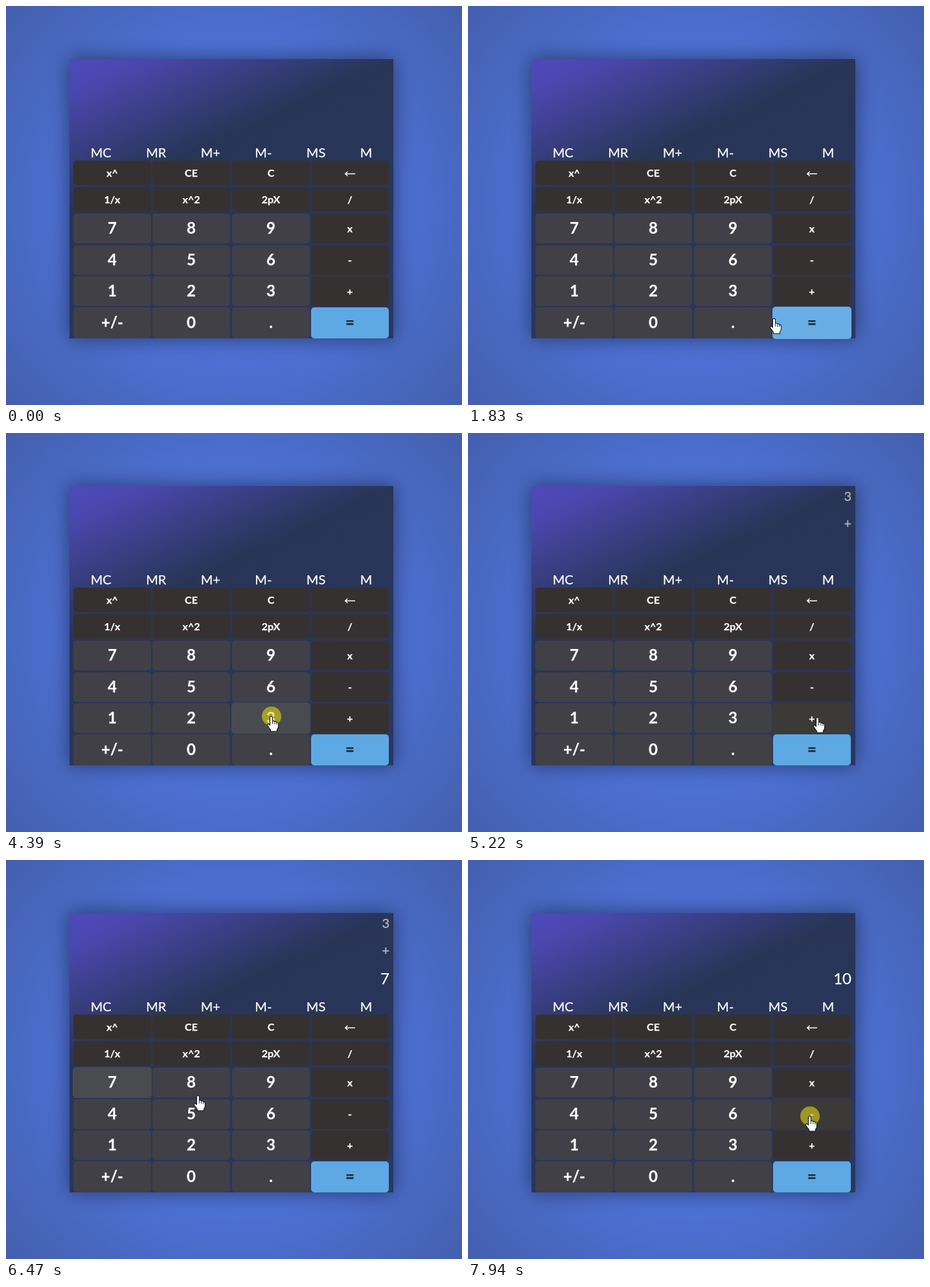
These frames come from a looping animation (704x617 px, 8 s). An HTML page with a canvas:

```html
<!DOCTYPE html>
<html lang="en">
<head>
<meta charset="utf-8">
<title>Calculator</title>
<style>
html, body { margin: 0; width: 100%; height: 100%; overflow: hidden; background: #4a6dcd; }
canvas { display: block; }
</style>
</head>
<body>
<canvas id="stage" width="704" height="617"></canvas>
<script>
const W = 704, H = 617, LOOP = 8000;
const STEP = 68, HOVER_LAG = 130, PRESS = 140;
const BOX = { x: 98, y: 82, w: 500, h: 432, pad: 6 };
const ctx = document.getElementById('stage').getContext('2d');

const LABELS = ['x^ CE C ←', '1/x x^2 2pX /', '7 8 9 x', '4 5 6 -', '1 2 3 +', '+/- 0 . ='];
const MEMORY = ['MC', 'MR', 'M+', 'M-', 'MS', 'M'];
const THEMES = {
  op: { fill: '#353130', hover: '#3c3a37', text: '#fff', size: 16 },
  num: { fill: '#414046', hover: '#4a4b4e', text: '#fff', size: 24 },
  eq: { fill: '#5ea9e3', hover: '#68aee5', text: '#1d2836', size: 24 }
};

const keys = LABELS.flatMap((row, r) => row.split(' ').map((label, c) => ({
  label,
  x: Math.round(104 + 122.4 * c),
  y: Math.round(r < 2 ? 239 + 41 * r : 321.2 + 48.3 * (r - 2)),
  w: 120,
  h: r < 2 ? 38 : r < 5 ? 46 : 48,
  theme: THEMES[label === '=' ? 'eq' : r < 2 || c === 3 ? 'op' : 'num']
})));

// Pointer moves: each goes from the last place to `to`, bowed by `bend` halfway
const ENTRY = [545, 590];
const MOVES = [
  { from: 1420, till: 2230, to: [408, 432], bend: [-3, -27] },
  { from: 2230, till: 2370, to: [424, 446], bend: [0, 0] },
  { from: 3120, till: 3190, to: [410, 438], bend: [0, 0] },
  { from: 4530, till: 4860, to: [540, 440], bend: [0, 0] },
  { from: 5220, till: 5968, to: [173, 346], bend: [-52, -63] },
  { from: 6330, till: 7100, to: [531, 507], bend: [110, -16] },
  { from: 7370, till: 7840, to: [528, 396], bend: [0, 0] }
];
const CLICKS = [[4390, '3'], [4950, '+'], [6190, '7'], [7160, '='], [7940, '-']];
const BURSTS = [1420, 4390, 5220, 6190, 7030];

function pointerAt(t) {
  if (t < MOVES[0].from) return null;
  let at = ENTRY;
  for (const { from, till, to, bend } of MOVES) {
    if (t < from) break;
    const p = Math.min(1, (t - from) / (till - from));
    at = at.map((v, i) => v + (to[i] - v) * p + 4 * p * (1 - p) * bend[i]);
  }
  return at;
}

// The pointer advances in even steps from the start of each burst
function snap(t) {
  const start = BURSTS.filter(s => s <= t).pop();
  return start === undefined ? t : start + Math.floor((t - start) / STEP) * STEP;
}

// Replay every key released so far
function screenAt(t) {
  const s = { first: '', op: '', main: '' };
  for (const [time, key] of CLICKS) {
    if (t < time + PRESS) break;
    if (key >= '0' && key <= '9') s.main += key;
    else if (key === '=') {
      s.main = String(Number(s.first) + Number(s.main));
      s.first = s.op = '';
    } else {
      s.first = s.main;
      s.op = key;
      s.main = '';
    }
  }
  return s;
}

function text(str, x, y, size, color, align = 'center', weight = 400) {
  ctx.font = `${weight} ${size}px Lato, sans-serif`;
  ctx.textAlign = align;
  ctx.fillStyle = ctx.strokeStyle = color;
  ctx.lineWidth = 0.25;
  ctx.fillText(str, x, y);
  ctx.strokeText(str, x, y);
}

function gradient(g, stops) {
  stops.forEach(([at, color]) => g.addColorStop(at, color));
  return g;
}

const backdrop = gradient(ctx.createRadialGradient(W / 2, H / 2, 0, W / 2, H / 2, 468), [
  [0, '#5079e6'], [0.53, '#4c70d3'], [0.75, '#4868c0'], [1, '#445fae']
]);
const panel = gradient(ctx.createLinearGradient(BOX.x, BOX.y, BOX.x + 255, BOX.y + 546), [
  [0, '#4e49b8'], [0.07, '#4c48b1'], [0.35, '#283556'], [1, '#2a3762']
]);

function drawCase() {
  ctx.fillStyle = backdrop;
  ctx.fillRect(0, 0, W, H);
  ctx.save();
  ctx.shadowColor = 'rgba(0, 0, 0, 0.48)';
  ctx.shadowBlur = 30;
  ctx.fillStyle = panel;
  ctx.fillRect(BOX.x, BOX.y, BOX.w, BOX.h);
  ctx.restore();
}

// Labels share the row with equal space around each
function drawMemory() {
  ctx.font = '400 20px Lato, sans-serif';
  const widths = MEMORY.map(m => ctx.measureText(m).width);
  const room = BOX.w - 2 * BOX.pad - widths.reduce((a, b) => a + b);
  const gap = room / MEMORY.length;
  let x = BOX.x + BOX.pad + gap / 2;
  MEMORY.forEach((m, i) => {
    text(m, x, 234, 20, '#fff', 'left');
    x += widths[i] + gap;
  });
}

function drawArrow(x, y) {
  ctx.strokeStyle = '#fff';
  ctx.lineWidth = 1.3;
  ctx.beginPath();
  ctx.moveTo(x + 8, y);
  ctx.lineTo(x - 7, y);
  ctx.moveTo(x - 3.5, y - 3.5);
  ctx.lineTo(x - 7.3, y);
  ctx.lineTo(x - 3.5, y + 3.5);
  ctx.stroke();
}

function drawKey({ x, y, w, h, theme, label }, hovered) {
  const grow = hovered ? 1 : 0;
  ctx.fillStyle = hovered ? theme.hover : theme.fill;
  ctx.beginPath();
  ctx.roundRect(x - grow, y - grow, w + 2 * grow, h + 2 * grow, 5);
  ctx.fill();
  const cx = x + w / 2, cy = y + h / 2;
  if (label === '←') drawArrow(cx, cy + 1.5);
  else text(label, cx, Math.ceil(cy + theme.size * 0.33), theme.size, theme.text, 'center', 700);
}

function drawScreen({ first, op, main }) {
  const right = BOX.x + BOX.w - BOX.pad;
  text(first, right, 105, 20, '#b9bcc2', 'right');
  text(op, right, 147, 20, '#b9bcc2', 'right');
  text(main, right, 192, 24, '#fff', 'right');
}

const hand = new Path2D('M-2 2Q-2 0 0 0Q2 0 2 2V7.5Q5 6.3 5.4 8.6Q8 7.2 8.4 9.8' +
  'Q11 8.8 11 12V16Q11 18.5 9 20.5V23.3H-1V21Q-3 18.5 -5.6 14.5Q-6.6 11.4 -3.8 12L-2 13.8Z');
const creases = new Path2D('M2 8V12M5.3 9V12.5M8.4 10V13');

function drawHand([x, y]) {
  ctx.save();
  ctx.translate(x - 0.5, y);
  ctx.lineJoin = 'round';
  ctx.lineWidth = 1.1;
  ctx.fillStyle = '#fff';
  ctx.strokeStyle = '#15171c';
  ctx.fill(hand);
  ctx.stroke(hand);
  ctx.lineWidth = 0.9;
  ctx.stroke(creases);
  ctx.restore();
}

function draw(t) {
  const now = snap(t);
  const tip = pointerAt(now), past = pointerAt(now - HOVER_LAG);
  const isOver = k => past && past[0] >= k.x && past[0] <= k.x + k.w &&
    past[1] >= k.y && past[1] <= k.y + k.h;
  drawCase();
  drawMemory();
  drawScreen(screenAt(t));
  keys.forEach(k => drawKey(k, isOver(k)));
  if (!tip) return;
  if (CLICKS.some(([time]) => t >= time && t < time + PRESS)) {
    ctx.fillStyle = 'rgba(225, 215, 20, 0.6)';
    ctx.beginPath();
    ctx.arc(tip[0], tip[1], 15, 0, Math.PI * 2);
    ctx.fill();
  }
  drawHand(tip);
}

const begin = performance.now();
function frame() {
  draw((performance.now() - begin) % LOOP);
  requestAnimationFrame(frame);
}
frame();
</script>
</body>
</html>
```
